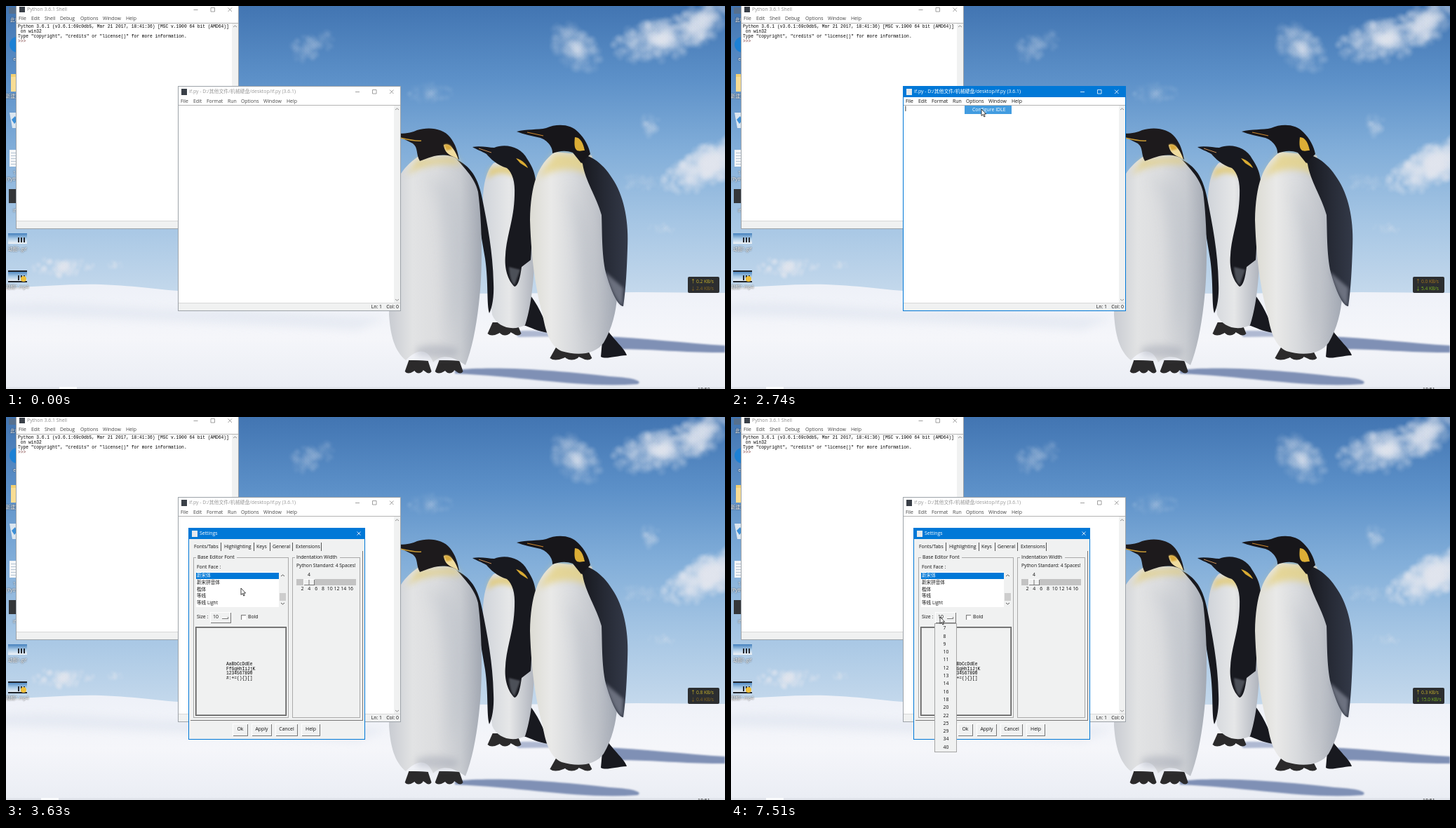
An HTML page with a canvas for the animation above (7.99 s loop, 1025 by 546 pixels).

```html
<!DOCTYPE html>
<html lang="zh">
<head>
<meta charset="utf-8">
<title>IDLE settings</title>
<style>
html, body { margin: 0; width: 100%; height: 100%; overflow: hidden; background: #fff; }
canvas { display: block; }
</style>
</head>
<body>
<canvas id="stage" width="1025" height="546"></canvas>
<script>
const W = 1025, H = 546, LOOP = 7990;
const UI = '"Open Sans","Noto Sans","Noto Sans CJK SC",sans-serif';
const MONO = '"Liberation Mono",monospace';
const BLUE = '#0078d7', FACE = '#f0f1f1';
const stage = document.getElementById('stage').getContext('2d');
let c = stage;

// Font size giving a 3.77 px column in the fixed-width face
c.font = '100px ' + MONO;
const monoSize = 377 / c.measureText('0').width;

function rect(x, y, x2, y2, fill) {
  c.fillStyle = fill;
  c.fillRect(x, y, x2 - x, y2 - y);
}
function frame(x, y, x2, y2, color, width = 1) {
  c.strokeStyle = color;
  c.lineWidth = width;
  c.strokeRect(x + .5, y + .5, x2 - x - 1, y2 - y - 1);
}
function text(s, x, y, color = '#111', size = 6.9, align = 'left') {
  c.font = size + 'px ' + UI;
  c.textBaseline = 'middle';
  c.textAlign = align;
  c.fillStyle = color;
  c.fillText(s, x, y);
}
function mono(s, x, y, color = '#000') {
  c.font = monoSize + 'px ' + MONO;
  c.textBaseline = 'middle';
  c.textAlign = 'left';
  c.fillStyle = color;
  c.fillText(s, x, y);
}
function shape(d, fill, blur = 0) {
  c.filter = blur ? `blur(${blur}px)` : 'none';
  c.fillStyle = fill;
  c.fill(new Path2D(d));
  c.filter = 'none';
}
function line(d, color, width = .8) {
  c.strokeStyle = color;
  c.lineWidth = width;
  c.stroke(new Path2D(d));
}
function fade(x, y, x2, y2, ...colors) {
  const g = c.createLinearGradient(x, y, x2, y2);
  colors.forEach((v, i) => g.addColorStop(i / (colors.length - 1), v));
  return g;
}

let seed = 7;
const rnd = () => (seed = seed * 16807 % 2147483647) / 2147483647;

// A loose heap of faint puffs, denser towards the middle
function cloud(x, y, w, h, alpha, tilt = 0) {
  const n = Math.round(w * h / 40) + 10;
  for (let i = 0; i < n; i++) {
    const a = rnd() * 6.283, r = rnd() ** .8;
    const px = x + Math.cos(a) * r * w / 2;
    const py = y + Math.sin(a) * r * h / 2 + (px - x) * tilt;
    const s = (.06 + .22 * rnd() * (1.1 - r)) * h + 3;
    const g = c.createRadialGradient(px, py, 0, px, py, s);
    g.addColorStop(0, `rgba(226,230,239,${alpha})`);
    g.addColorStop(1, 'rgba(226,230,239,0)');
    c.fillStyle = g;
    c.fillRect(px - s, py - s, 2 * s, 2 * s);
  }
}

function landscape() {
  rect(0, 0, W, H, fade(0, 0, 0, 412, '#4275b2', '#5c90c8', '#82aed9', '#a6c6e4', '#c5d9ec'));
  cloud(435, 57, 66, 40, .06, -.3);
  cloud(812, 60, 72, 62, .1, .4);
  cloud(930, 48, 130, 62, .16, -.15);
  cloud(990, 24, 80, 64, .14, -.4);
  cloud(1005, 226, 140, 62, .27, -.4);
  cloud(905, 252, 64, 24, .05);
  cloud(918, 170, 26, 36, .08);
  cloud(605, 125, 64, 32, .04);
  cloud(82, 372, 88, 28, .24);
  cloud(157, 370, 24, 14, .1);
  cloud(935, 318, 48, 16, .06);
  shape('M0 402C50 400 90 396 135 397C190 399 220 405 260 407L700 410L900 408L1025 409V546H0Z',
    fade(0, 400, 0, 546, '#eef1f8', '#f5f6fa', '#eaedf4'));
  shape('M-10 425C100 415 200 440 320 432L540 445L500 462C300 450 140 445 -10 440Z', 'rgba(210,218,232,.35)', 6);
  const shade = '#7f90b5';
  shape('M850 471C910 473 970 481 1025 484V494C970 495 900 487 860 490Z', shade, .8);
  shape('M640 519C700 512 800 521 860 528C900 530 908 536 900 539C820 545 740 528 640 524Z', shade, .8);
  shape('M725 464C760 460 780 467 795 471L730 472Z', 'rgba(128,146,184,.6)', 1);
}

function toes(x, y, w) {
  for (const i of [-1, 0, 1])
    shape(`M${x - w * .36} ${y - 10}L${x + w * .36} ${y - 9}L${x + i * w * .34 + w * .15} ${y + 6}`
      + `Q${x + i * w * .4} ${y + 11} ${x + i * w * .38 - w * .13} ${y + 6}Z`, '#2b2a2b');
}

function penguins() {
  const ink = '#18191f';
  // Middle bird
  toes(711, 461, 48);
  shape('M742 405C758 425 768 445 773 466C758 464 748 458 738 455Z', ink);
  shape('M695 224C680 240 679 270 680 300C682 360 689 405 693 440C700 458 722 464 740 455C752 420 755 360 755 300L750 230L725 215Z',
    fade(678, 0, 757, 0, '#cfd3d9', '#e6e7e8', '#a9aeb8'));
  shape('M690 231L736 221L728 245C712 237 700 236 686 247Z', 'rgba(226,200,110,.75)', 3);
  shape('M665 201C677 199 688 202 696 202C712 195 735 201 743 218C752 232 757 241 756 275C749 310 750 340 748 362L735 372C733 388 730 399 725 400C716 392 710 375 712 355C714 325 724 306 725 270C726 250 722 238 714 231C700 227 690 217 685 211C678 207 670 204 665 201Z', ink);
  shape('M727 217C736 219 743 227 744 231L733 224Z', '#d9ab33');
  line('M674 203L692 209', '#c88d54', 1);
  shape('M717 372L733 376L725 398Q718 392 717 372Z', 'rgba(120,125,135,.55)', 1);

  // Left bird
  toes(588, 515, 38);
  toes(632, 515, 40);
  shape('M637 216C658 226 672 238 679 275C686 310 694 350 695 395C696 415 693 430 689 438C685 425 688 395 683 360L664 250Z', ink);
  shape('M590 213C568 228 552 245 548 290L546 440C548 470 554 492 570 505C585 490 600 486 609 508C622 495 638 500 655 512C664 490 670 460 674 425C680 380 679 310 673 265C668 243 650 228 638 213Z',
    fade(546, 0, 682, 0, '#c9ccd2', '#e2e3e4', '#dcdddf', '#c9ccd1', '#9da3ae'));
  shape('M600 245C640 240 655 280 655 340C656 400 650 440 636 470C625 400 630 310 600 245Z', 'rgba(180,185,195,.3)', 10);
  shape('M585 488C600 480 630 482 645 490L640 500L612 502L585 498Z', 'rgba(150,156,170,.4)', 5);
  shape('M586 218L640 214L650 228C622 222 590 228 570 242Z', 'rgba(226,206,128,.7)', 4);
  shape('M550 181C566 183 578 181 586 177C602 172 623 174 633 187C641 197 644 208 646 219C625 207 608 214 590 221C584 211 588 202 580 196C570 191 560 186 550 181Z', '#1d1a1c');
  line('M562 188C575 191 584 193 592 192', '#c99a35', 1.6);
  shape('M624 198C633 194 641 206 645 219C638 213 626 214 624 198Z', '#efdca0');
  shape('M624 198C631 195 635 200 636 204L628 206Z', '#d9a93c', 1);

  // Right bird
  toes(806, 496, 60);
  shape('M852 455C868 478 882 488 885 498C868 499 855 504 848 500Z', ink);
  shape('M783 208C758 225 748 255 747 305C749 370 757 410 765 440C770 470 778 486 792 492C815 499 840 497 852 480C864 460 870 435 871 415L855 300L835 213Z',
    fade(746, 0, 870, 0, '#dcdbd3', '#e9e9e8', '#d8dadd', '#c3c6cc', '#a3a9b4'));
  shape('M782 210L830 212L836 243C805 225 775 235 757 246Z', 'rgba(228,208,126,.75)', 5);
  shape('M800 260C840 300 850 390 835 470C815 440 825 340 800 260Z', 'rgba(180,185,196,.35)', 9);
  shape('M813 211C832 210 852 224 867 250C882 275 888 310 886 345C885 375 884 400 880 428C872 428 862 405 855 380C849 355 850 320 849 298C841 270 826 250 822 225Z',
    fade(820, 0, 888, 0, '#17181e', '#262a35', '#343a49'));
  shape('M853 378L880 402L879 428Q866 418 853 378Z', 'rgba(150,156,170,.6)', 2);
  shape('M728 179C742 175 758 177 770 174C785 167 806 168 816 180C825 189 831 200 833 211L820 224L808 209C797 205 788 207 779 210C780 201 771 191 762 188C750 185 738 183 728 179Z', '#17161a');
  line('M743 180L766 185', '#c8852e', 1.2);
  shape('M811 187C819 187 823 196 825 206C818 206 808 212 811 187Z', '#dcae36', .6);
}

function label(s, x, y) {
  c.shadowColor = '#000';
  c.shadowBlur = 2;
  text(s, x, y, '#fff', 6.6, 'center');
  c.shadowBlur = 0;
}

function desktopIcons() {
  rect(4, 2, 16, 11, '#55708f');
  label('此电脑', 16, 20);
  c.fillStyle = '#1c80d4';
  c.beginPath();
  c.arc(16, 55, 11, 0, 7);
  c.fill();
  label('e', 12, 76);
  rect(7, 97, 22, 122, '#f2cf72');
  rect(7, 101, 14, 122, '#f8dd94');
  label('新建文件', 13, 129);
  shape('M5 152H25L22 174H9Z', '#dbe6f0');
  shape('M8 162L13 157L16 163L12 168Z', '#3d8fd6');
  rect(5, 205, 24, 229, '#f4f6f8');
  for (let y = 209; y < 228; y += 4) rect(7, y, 20, y + 1, '#b6c4d2');
  label('1', 12, 238);
  label('(Python', 12, 247);
  rect(4, 261, 26, 281, '#343639');
  label('if', 12, 292);
  for (const y of [324, 378]) {
    rect(3, y, 30, y + 15, fade(0, y, 0, y + 15, '#4480bd', '#a9cae6', '#f2f4f7'));
    for (const x of [17, 21, 25]) rect(x, y + 6, x + 2, y + 13, '#25272d');
  }
  for (const y of [377, 392]) rect(3, y, 30, y + 2, '#20242b');
  c.fillStyle = '#efc03a';
  c.beginPath();
  c.arc(25, 389, 4, 0, 7);
  c.fill();
  label('动图1.gif', 16, 347);
  label('视频1.mp4', 16, 401);
}

function windowButtons(x, y, color) {
  line(`M${x - 51.5} ${y + .5}h6M${x - 27} ${y - 2.5}h5.5v5.5h-5.5ZM${x - 2.5} ${y - 2.5}l5.5 5.5m0 -5.5l-5.5 5.5`, color);
}
function menuBar(names, xs, y, color) {
  names.forEach((s, i) => text(s, xs[i], y, color));
}
function chevron(x, y, up, color = '#777') {
  const d = up ? -2 : 2;
  line(`M${x - 2.5} ${y - d / 2}l2.5 ${d}l2.5 ${-d}`, color);
}

function shell() {
  rect(14, -6, 332, 318, '#9da3a9');
  rect(15, -6, 331, 317, '#fff');
  rect(19, 1, 27, 9, '#3a4048');
  text('Python 3.6.1 Shell', 30, 5, '#8d8d8d');
  windowButtons(319, 5, '#888');
  menuBar(['File', 'Edit', 'Shell', 'Debug', 'Options', 'Window', 'Help'],
    [18, 36, 55, 77, 106, 138, 171], 18.5, '#444');
  rect(15, 24, 331, 25, '#b4b4b4');
  rect(322, 25, 331, 306, FACE);
  chevron(326.5, 29, true);
  rect(15, 306, 331, 317, FACE);
  rect(15, 306, 331, 307, '#d8d8d8');
  mono('Python 3.6.1 (v3.6.1:69c0db5, Mar 21 2017, 18:41:36) [MSC v.1900 64 bit (AMD64)]', 17, 29);
  mono(' on win32', 17, 36);
  mono('Type "copyright", "credits" or "license()" for more information.', 17, 43);
  mono('>>> ', 17, 50, '#7a3a3a');
}

function editor(active) {
  const dim = active ? '#fff' : '#999';
  rect(245, 114, 563, 435, active ? BLUE : '#9da3a9');
  rect(246, 115, 562, 434, '#fff');
  if (active) rect(245, 114, 563, 130, BLUE);
  rect(250, 118, 258, 127, active ? '#e4e8ec' : '#3a4048');
  text('if.py - D:/其他文件/机械硬盘/desktop/if.py (3.6.1)', 261, 122.5, dim);
  windowButtons(549.5, 122, active ? '#fff' : '#888');
  menuBar(['File', 'Edit', 'Format', 'Run', 'Options', 'Window', 'Help'],
    [249, 267, 286, 316, 335, 367, 400], 136, active ? '#111' : '#444');
  rect(246, 141, 562, 142, '#b4b4b4');
  rect(553, 142, 562, 424, FACE);
  chevron(557.5, 147, true);
  chevron(557.5, 419, false);
  rect(246, 423, 562, 434, FACE);
  rect(246, 423, 562, 424, '#d8d8d8');
  text('Ln: 1', 536, 429, '#111', 6.9, 'right');
  text('Col: 0', 560, 429, '#111', 6.9, 'right');
  if (active) rect(248.5, 142.5, 249.3, 150, '#111');
}

function raised(x, y, x2, y2) {
  rect(x, y, x2, y2, '#fff');
  rect(x + 1, y + 1, x2, y2, '#777');
  rect(x + 1, y + 1, x2 - 1, y2 - 1, FACE);
}
function group(name, x, x2, width) {
  frame(x, 200, x2, 429, '#aaa');
  rect(x + 4, 197, x + 8 + width, 204, FACE);
  text(name, x + 6, 200.5);
}

function settingsPage() {
  ['Fonts/Tabs', 'Highlighting', 'Keys', 'General', 'Extensions']
    .forEach((s, i) => text(s, [268, 311, 357, 380, 413][i], 185.5));
  for (const x of [306, 353, 376, 408, 449]) rect(x, 179, x + 1, 191, '#555');
  group('Base Editor Font', 267, 403, 54);
  group('Indentation Width', 408, 505, 60);

  text('Font Face :', 272, 214.5);
  rect(271, 221, 389, 271, '#fff');
  rect(271, 222, 389, 231, BLUE);
  ['新宋体', '新宋拼音体', '楷体', '等线', '等线 Light']
    .forEach((s, i) => text(s, 272, 226.5 + i * 9.7, i ? '#111' : '#fff', 6.6));
  chevron(394.5, 226, true, '#333');
  rect(390, 251, 399, 262, '#cdcdcd');
  chevron(394.5, 266, false, '#333');

  text('Size :', 272, 285.5);
  raised(291, 278, 321, 294);
  text('10', 295, 285.5);
  rect(308, 285, 317, 288, '#777');
  rect(308, 285, 316, 287, '#fff');
  rect(335, 282, 342, 289, '#777');
  rect(336, 283, 342, 289, '#fff');
  text('Bold', 345, 285.5);

  frame(270, 299, 400, 426, '#555');
  frame(271, 300, 399, 425, '#999');
  ['AaBbCcDdEe', 'FfGgHhIiJjK', '1234567890', '#:+=(){}[]']
    .forEach((s, i) => mono(s, 314, 352 + i * 6.9));

  text('Python Standard: 4 Spaces!', 414, 212, '#111', 6.7);
  text('4', 432, 225.5, '#111', 6.9, 'center');
  rect(414, 231, 499, 240, '#c3c3c3');
  raised(424, 231, 440, 240);
  rect(431.5, 232, 432.5, 239, '#777');
  for (let n = 2; n <= 16; n += 2) text(n, 422.5 + (n - 2) * 4.9, 245.5, '#111', 6.9, 'center');
}

function dialog(t) {
  const p = Math.min(1, (t - 3020) / 145), k = .945 + .055 * p;
  c.save();
  c.globalAlpha = Math.max(.08, p);
  c.translate(386, 309);
  c.scale(k, k);
  c.translate(-386, -309);
  rect(260, 158, 512, 460, FACE);
  frame(260, 158, 512, 460, BLUE);
  rect(260, 158, 512, 174, BLUE);
  rect(265, 162, 273, 171, '#e4e8ec');
  text('Settings', 276, 166.5, '#fff');
  line('M500.5 163.5l5 5m0 -5l-5 5', '#fff');
  rect(508, 191, 509, 433, '#777');
  rect(263, 432, 509, 433, '#777');
  [['Ok', 323, 345], ['Apply', 350, 379], ['Cancel', 384, 416], ['Help', 421, 448]]
    .forEach(([s, x, x2]) => {
      raised(x, 437, x2, 455);
      text(s, (x + x2) / 2, 445.5, '#111', 6.9, 'center');
    });
  if (t >= 3200) settingsPage();
  c.restore();
}

function sizeList(t) {
  c.save();
  c.globalAlpha = Math.min(1, (t - 6900) / 280);
  rect(290, 294, 322, 478, FACE);
  frame(290, 294, 322, 478, '#a5a5a5');
  [7, 8, 9, 10, 11, 12, 13, 14, 16, 18, 20, 22, 25, 29, 34, 40]
    .forEach((n, i) => text(n, 302.5, 301.5 + i * 11.3));
  c.restore();
}

const traffic = [[0, .2, 2.4], [430, 0, .4], [1370, 0, 15.6], [2400, 0, 5.4], [3430, .8, .4],
  [4450, 0, 2.4], [5450, 0, 15.5], [6510, 0, 5.4], [7510, .3, 15]];

function meter(t) {
  const [, up, down] = traffic.findLast(v => v[0] <= t);
  c.fillStyle = '#2c2e30';
  c.beginPath();
  c.roundRect(972, 386, 45, 23, 2);
  c.fill();
  const row = (arrow, v, y, color) => {
    text(arrow, 976, y, color);
    text(v.toFixed(1) + ' KB/s', 984, y, color, 6.6);
  };
  row('↑', up, 393, up ? '#c9b42a' : '#a8781c');
  row('↓', down, 403.5, down > 5 ? '#7ab51f' : '#86681f');
}

function taskbar(t) {
  rect(0, 543, W, H, 'rgba(222,226,232,.75)');
  const x = t < 1700 ? 76 : 50;
  rect(x, 543, x + 25, H, '#fafbfc');
  text(t < 1370 ? '18:50' : '18:51', 986, 547.5, '#222');
}

const path = [[350, 420, 525], [600, 385, 330], [1100, 338, 138], [1170, 339, 137], [1600, 339, 137],
  [2200, 345, 133], [2600, 357, 147], [3200, 357, 147], [3630, 335, 244], [3760, 334, 247],
  [3900, 330, 248], [4100, 330, 248], [4450, 322, 208], [4860, 330, 290], [5670, 311, 287],
  [5740, 308, 286], [5810, 302, 286], [6030, 298, 285], [LOOP, 298, 285]];

function pointer(t) {
  if (t < 350) return;
  const i = path.findIndex(v => v[0] > t);
  const [t0, x0, y0] = path[i - 1], [t1, x1, y1] = path[i];
  const p = (t - t0) / (t1 - t0);
  c.save();
  c.translate(x0 + (x1 - x0) * p, y0 + (y1 - y0) * p);
  if (t >= 2950 && t < 3230) {
    line('M-2 -4H2M0 -4V4M-2 4H2', '#111', 1);
  } else {
    const d = 'M0 0V9.5L2.2 7.5L3.8 11L5.2 10.4L3.7 7H6.6Z';
    shape(d, '#fff');
    line(d, '#111', .8);
  }
  c.restore();
}

// Everything that never changes is painted once
const still = document.createElement('canvas');
still.width = W;
still.height = H;
c = still.getContext('2d');
landscape();
penguins();
desktopIcons();
shell();
c = stage;

function draw(now) {
  const t = now % LOOP;
  c.drawImage(still, 0, 0);
  taskbar(t);
  editor(t >= 1650 && t < 3020);
  if (t >= 1720 && t < 2950) {
    const hover = t >= 2450;
    rect(333, 142, 400, 154, hover ? '#429ce0' : FACE);
    text('Configure IDLE', 344, 148.5, hover ? '#fff' : '#111');
  }
  if (t >= 3020) dialog(t);
  if (t >= 6970) sizeList(t);
  meter(t);
  pointer(t);
  requestAnimationFrame(draw);
}
requestAnimationFrame(draw);
</script>
</body>
</html>
```
